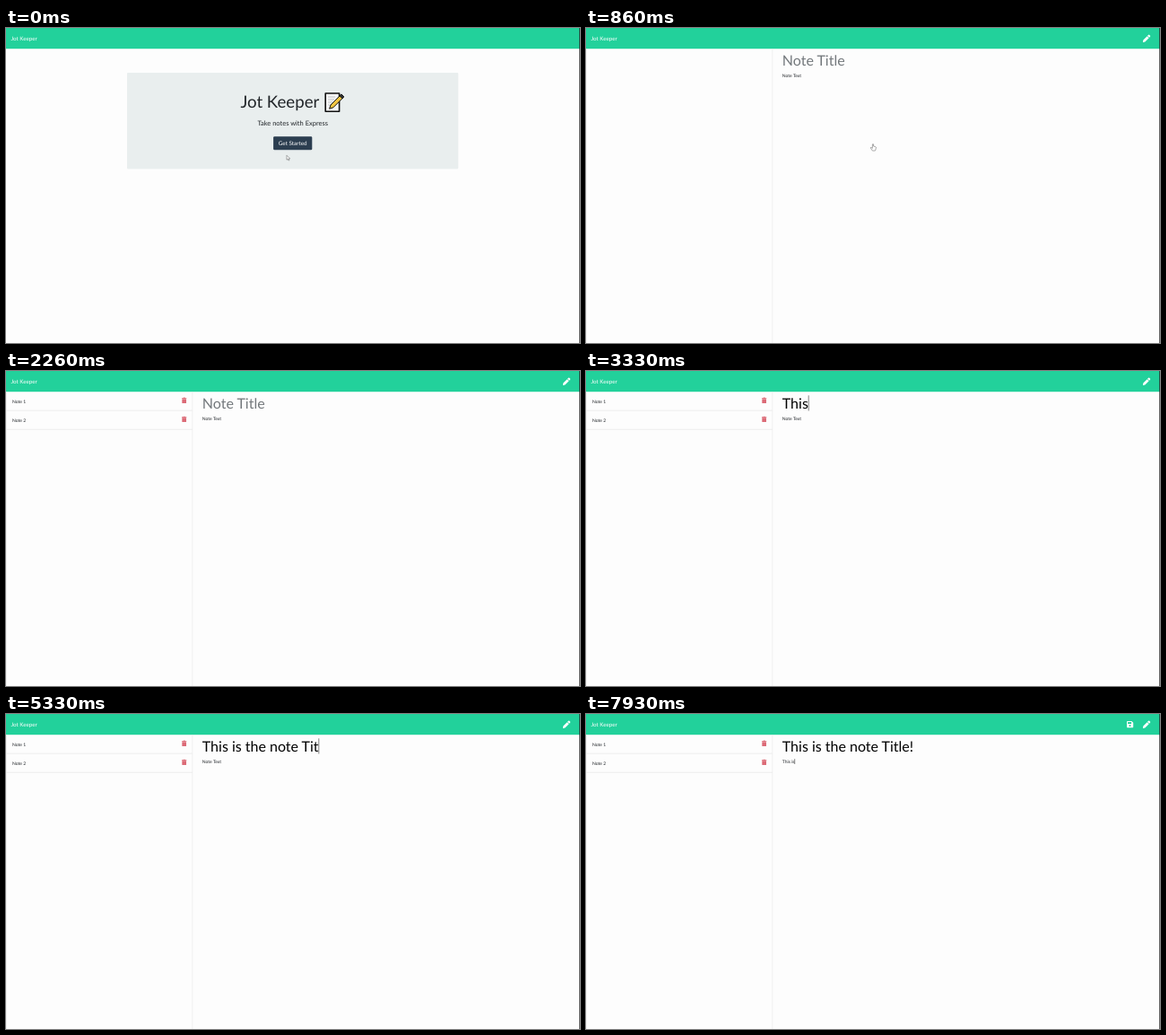
Recreate the animation shown at these times as an HTML page. Size 640 by 352 pixels, loop 8000 ms.

```html
<!DOCTYPE html>
<html lang="en">
<head>
<meta charset="utf-8">
<title>Jot Keeper</title>
<style>
  html, body { margin: 0; width: 100%; height: 100%; overflow: hidden; background: #fdfdfd; }
  svg { display: block; width: 640px; height: 352px; }
  text { font-family: Lato, sans-serif; white-space: pre; text-rendering: geometricPrecision; }
  .small { font-size: 5px; fill: #212529; }
  .large { font-size: 16px; }
</style>
</head>
<body>
<svg viewBox="0 0 640 352">
  <defs>
    <g id="trash" fill="#dc6b77">
      <path d="M196 30.2h1.6l.4-.6h1.4l.4.6h1.5v.9h-5.3z"/>
      <path d="M196.3 31.2h4.7v4.2q0 .6-.6.6h-3.5q-.6 0-.6-.6z"/>
    </g>
  </defs>
  <rect width="640" height="352" fill="#fdfdfd"/>
  <rect width="640" height="23.2" fill="#22d19b"/>
  <text x="5.4" y="14" font-size="6.25" fill="#fff">Jot Keeper</text>

  <g id="home">
    <rect x="135" y="50" width="369.3" height="107.4" rx="1" fill="#e9eeee"/>
    <text x="349.3" y="89.3" font-size="18.67" fill="#212529" text-anchor="end">Jot Keeper</text>
    <g stroke-linejoin="round">
      <path d="M356.2 73h15.4v20.3h-15.4z" fill="#f4f4f4" stroke="#111" stroke-width="1.6"/>
      <path d="M359 77h8M359 80h7M359 83h5M359 86h3" stroke="#b5b9bc" stroke-width=".8"/>
      <path d="M360.6 90.2l1.4-4.2 11.2-11.3 2.9 2.9-11.3 11.3z" fill="#f5c542" stroke="#111" stroke-width="1"/>
      <path d="M372 75.8l1.9-1.9 2.9 2.9-1.9 1.9z" fill="#333" stroke="#111"/>
    </g>
    <text x="319.7" y="108.7" font-size="7.5" fill="#212529" text-anchor="middle">Take notes with Express</text>
    <rect id="ring" x="297.3" y="120.6" width="44.8" height="16.4" rx="2" fill="#2c3e50" fill-opacity=".5"/>
    <rect id="button" x="298.1" y="121.3" width="43.2" height="15" rx="1.3"/>
    <text x="319.7" y="131" font-size="6.3" fill="#fff" text-anchor="middle">Get Started</text>
  </g>

  <g id="notes">
    <path d="M.5 23.2V352M207.8 23.2V352" stroke="#ebebeb" stroke-width=".7"/>
    <g id="list">
      <path d="M.5 44.1H207.8M.5 65.3H207.8" stroke="#e6e6e6" stroke-width=".7"/>
      <text class="small" x="7" y="35.5">Note 1</text>
      <text class="small" x="7" y="56.6">Note 2</text>
      <use href="#trash"/>
      <use href="#trash" y="21.1"/>
    </g>
    <text id="title" class="large" x="218.8" y="41.7"></text>
    <text id="body" class="small" x="218.8" y="54.9"></text>
    <rect id="caret" width=".6" fill="#333"/>
    <path d="M620.9 15.9l.4-2.4 4.3-4.3 2 2-4.3 4.3zM626 8.8l1-1q.6-.5 1.2 0l.8.8q.5.6 0 1.2l-1 1z" fill="#fff"/>
    <path id="save" fill="#fff" fill-rule="evenodd" d="M603.7 8h4.7l1.8 1.8v4.7q0 .7-.7.7h-5.8q-.7 0-.7-.7v-5.8q0-.7.7-.7zM604.1 9v1.9h4V9zM606.5 12a1.05 1.05 0 1 0 .01 0z"/>
  </g>

  <g id="arrow" fill="#fff" stroke="#555" stroke-width=".5" stroke-linejoin="round">
    <path d="M0 0v5l1.2-1 .8 1.8.9-.4-.8-1.7h1.6z"/>
  </g>
  <g id="hand" fill="#fff" stroke="#555" stroke-width=".5" stroke-linejoin="round">
    <path d="M-.6.5q.6-.9 1.2 0v2.2l2.3.6q.6.2.5.9l-.5 2.5-.5 1h-3l-2-2.9q-.3-.9.6-.8l1.4 1z"/>
  </g>
  <rect x="639.3" width=".7" height="352" fill="#222"/>
</svg>
<script>
const LOOP = 8000;
const OPEN = 860, LISTED = 930, FOCUS = 1730, TAB = 6530;
const PRESS = 730;

const el = id => document.getElementById(id);
const show = (id, on) => el(id).setAttribute('display', on ? 'inline' : 'none');
const set = (id, attrs) => {
  for (const k in attrs) el(id).setAttribute(k, attrs[k]);
};
const ease = (t, a, b) => {
  const p = Math.min(1, Math.max(0, (t - a) / (b - a)));
  return p * p * (3 - 2 * p);
};

const fields = {
  title: {
    text: 'This is the note Title!', hint: 'Note Title', ink: '#000',
    top: 27.3, height: 17.2, from: FOCUS,
    keys: [2800, 3130, 3200, 3260, 3400, 3460, 3600, 3730, 3930, 4000, 4060, 4200,
           4330, 4530, 4600, 4660, 4800, 5000, 5200, 5330, 5530, 5660, 6000]
  },
  body: {
    text: 'This is', hint: 'Note Text', ink: '#212529',
    top: 50.2, height: 5.8, from: TAB,
    keys: [7060, 7130, 7200, 7260, 7400, 7460, 7600]
  }
};

const typed = (f, t) => f.keys.filter(k => k <= t).length;

function drawField(id, t) {
  const f = fields[id], n = typed(f, t);
  el(id).textContent = n ? f.text.slice(0, n).replace(/ /g, '\u00a0') : f.hint;
  set(id, { fill: n ? f.ink : '#73787c' });
}

function drawCaret(t) {
  const id = t < TAB ? 'title' : 'body';
  const f = fields[id], n = typed(f, t);
  const last = n ? f.keys[n - 1] : f.from;
  show('caret', t >= FOCUS && (t - last) % 1060 < 530);
  const width = n ? el(id).getComputedTextLength() : 0;
  set('caret', { x: 218.8 + width, y: f.top, height: f.height });
}

function drawPointer(t) {
  const go = ease(t, 60, 600), leave = ease(t, LISTED - 60, 1130);
  const x = 313 + 7 * go - 32 * leave;
  const y = 142.3 - 12.9 * go - 74 * leave;
  const over = y < 136.3 && t < LISTED;
  const place = { transform: `translate(${x} ${y})` };
  show('hand', over);
  show('arrow', !over && t < 1130);
  set('hand', place);
  set('arrow', place);
  set('button', { fill: over ? (t >= PRESS ? '#1a252f' : '#1e2b37') : '#2c3e50' });
  show('ring', t >= PRESS);
}

function draw(t) {
  show('home', t < OPEN);
  show('notes', t >= OPEN);
  show('list', t >= LISTED);
  show('save', t >= fields.body.keys[0]);
  drawField('title', t);
  drawField('body', t);
  drawCaret(t);
  drawPointer(t);
}

function tick() {
  draw(performance.now() % LOOP);
  requestAnimationFrame(tick);
}
tick();
</script>
</body>
</html>
```
